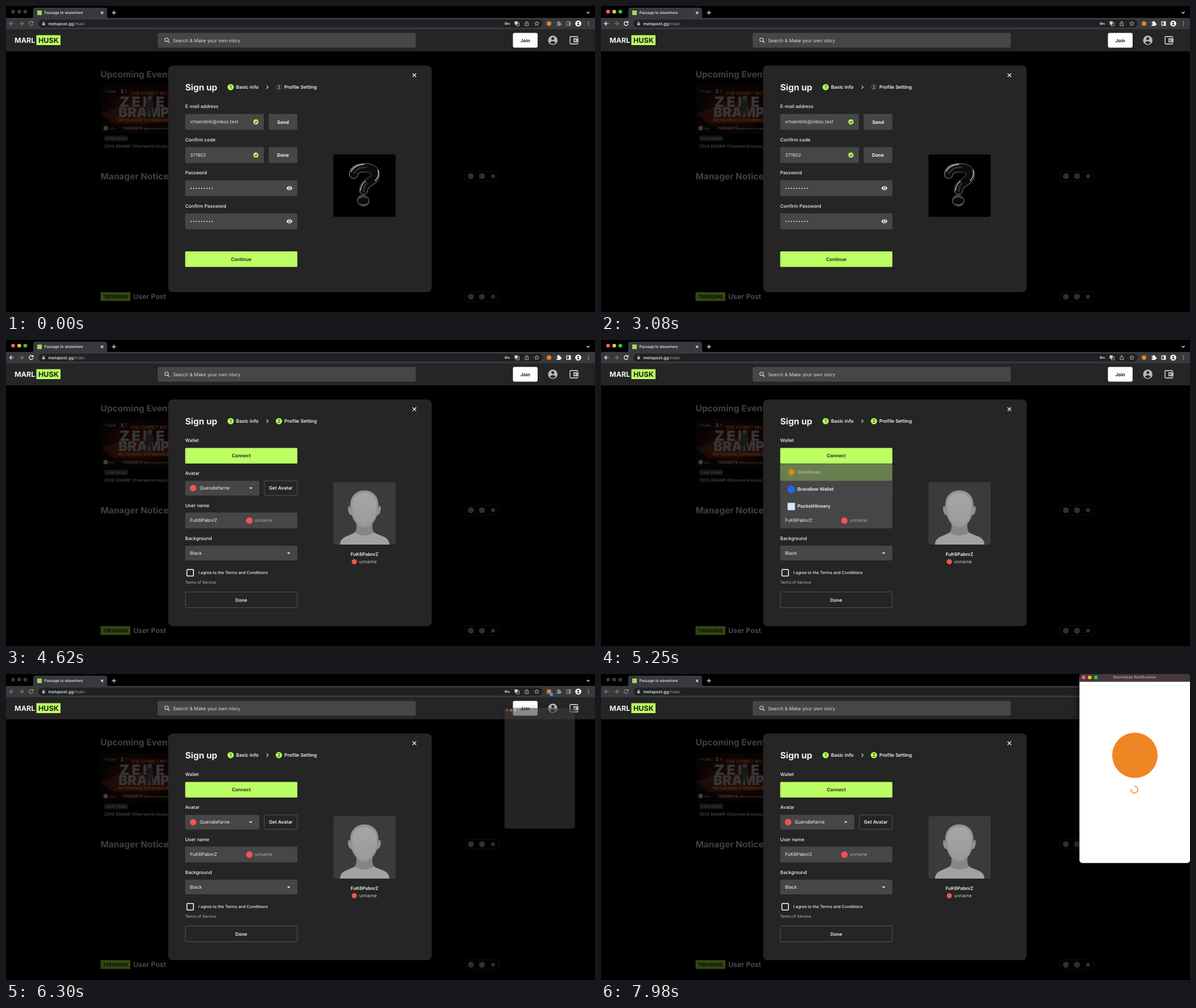
An HTML page for the animation above (8 s loop, 1037 by 540 pixels).

```html
<!DOCTYPE html>
<html lang="en">
<head>
<meta charset="utf-8">
<title>Sign up</title>
<style>
html, body { margin: 0; width: 100%; height: 100%; overflow: hidden; background: #000; }
svg { display: block; width: 100%; height: 100%; }
svg { font: 8.2px Inter, Roboto, sans-serif; fill: #f2f2f2; }
text { text-rendering: geometricPrecision; white-space: pre; }
.b { font-weight: 700; }
.sb { font-weight: 600; }
.m { font-weight: 500; }
.xb { font-weight: 800; }
.mid { text-anchor: middle; }
.ink { fill: #1c1c1c; }
.h { font-size: 15.4px; font-weight: 700; }
.dim { fill: #3f3f3f; }
.field { fill: #464646; }
.lime { fill: #bbff62; }
.edge { fill: none; stroke: #5c5c5c; stroke-width: .9; }
.line { fill: none; stroke: currentColor; stroke-width: 1.2; }

.live, .lights, .caret, .one, .two, .list, .badge, .popup, .page, .title { animation: 8s step-end infinite; }
.live { color: #8b8b8b; animation-name: wake; }
.lights { opacity: 0; animation-name: lights; }
.caret { opacity: 0; animation-name: caret; }
.one { animation-name: one; }
.two { opacity: 0; animation-name: two; }
.list { opacity: 0; animation-name: list; }
.row rect { animation: row 8s linear infinite; }
.row text { animation: rowtext 8s linear infinite; }
.badge { opacity: 0; animation-name: badge; }
.popup { opacity: 0; transform-origin: 939.5px 166px; animation-name: popup; filter: drop-shadow(0 5px 8px #0009); }
.page { opacity: 0; animation-name: page; }
.title { opacity: 0; animation-name: title; }
.spin { transform-origin: 939px 204px; animation: spin 8s linear infinite; }

@keyframes wake { 0%, 77.875%, 100% { color: #8b8b8b } 19.25% { color: #fff } }
@keyframes lights { 0%, 77.875%, 100% { opacity: 0 } 19.25% { opacity: 1 } }
@keyframes caret { 0%, 25.375%, 38.5%, 100% { opacity: 0 } 19.25%, 32.375% { opacity: 1 } }
@keyframes one { 0% { opacity: 1 } 42.875%, 100% { opacity: 0 } }
@keyframes two { 0% { opacity: 0 } 42.875%, 100% { opacity: 1 } }
@keyframes list { 0%, 76.125%, 100% { opacity: 0 } 60.375% { opacity: 1 } }
@keyframes row { 0%, 64.3% { fill: #464646; animation-timing-function: ease } 70.875%, 100% { fill: #bbff62 } }
@keyframes rowtext { 0%, 64.3% { fill: #f2f2f2; animation-timing-function: ease } 70.875%, 100% { fill: #1c1c1c } }
@keyframes badge { 0% { opacity: 0 } 76.125%, 100% { opacity: 1 } }
@keyframes popup {
  0% { opacity: 0; transform: scale(.4) }
  77.875% { opacity: .25; transform: scale(.42) }
  78.75% { opacity: .6; transform: scale(.638) }
  79.625% { opacity: .95; transform: scale(.92) }
  80.5%, 100% { opacity: 1; transform: none }
}
@keyframes page { 0% { opacity: 0 } 80.5%, 100% { opacity: 1 } }
@keyframes title { 0% { opacity: 0 } 82.25%, 100% { opacity: 1 } }
@keyframes spin {
  0%, 80.5% { transform: rotate(0deg); animation-timing-function: steps(22) }
  99.75%, 100% { transform: rotate(590deg) }
}
</style>
</head>
<body>
<svg viewBox="0 0 1037 540" preserveAspectRatio="none">
<defs>
  <radialGradient id="glow"><stop offset="0" stop-color="#260d06"/><stop offset=".6" stop-color="#140704"/><stop offset="1" stop-color="#060303"/></radialGradient>
  <linearGradient id="face" x2="0" y2="1"><stop offset="0" stop-color="#a6a6a6"/><stop offset="1" stop-color="#9a9a9a"/></linearGradient>
  <linearGradient id="glass" x2="1" y2="1"><stop offset="0" stop-color="#8c8c8c"/><stop offset=".5" stop-color="#3c3c3c"/><stop offset="1" stop-color="#7c7c7c"/></linearGradient>
  <filter id="soft"><feGaussianBlur stdDeviation=".6"/></filter>
  <path id="hook" d="M612 297C613 288 623 285.500 633 285.500C647 285.500 652 293 649.500 301C646 311 630 311 629.500 325"/>
  <g id="eye">
    <path fill="#fff" d="M-5.200 0C-3-4.700 3-4.700 5.200 0C3 4.700-3 4.700-5.200 0Z"/>
    <circle r="2.500" fill="#464646"/><circle r="1.400" fill="#fff"/>
  </g>
  <g id="tick">
    <circle r="4.600" class="lime"/><path d="M-2.200.1L-.6 1.700L2.300-1.500" fill="none" stroke="#333" stroke-width="1.200"/>
  </g>
  <path id="drop" d="M-2.800-1.300H2.800L0 1.600Z" fill="#fff"/>
  <path id="dots" d="M326 0H364" fill="none" stroke="#fff" stroke-width="1.900" stroke-linecap="round" stroke-dasharray="0 4.620"/>
  <g id="chips">
    <rect x="808.500" y="-8.500" width="59.500" height="17" rx="2" fill="none" stroke="#111"/>
    <g fill="#2e2e2e"><circle cx="818.500" r="5.300"/><circle cx="838" r="5.300"/><circle cx="857.500" r="3.600"/></g>
  </g>
</defs>

<rect width="1037" height="540" fill="#000"/>

<!-- browser -->
<path d="M45 22Q48 21 48 18V7Q48 3 52 3H174Q178 3 178 7V18Q178 21 181 22Z" fill="#38393c"/>
<rect y="21" width="1037" height="20" fill="#38393c"/>
<rect x="57" y="24" width="888" height="14" rx="7" fill="#202124"/>
<g fill="#3b3b3b"><circle cx="12.500" cy="10" r="3.300"/><circle cx="23.300" cy="10" r="3.300"/><circle cx="34" cy="10" r="3.300"/></g>
<g class="lights"><circle cx="12.500" cy="10" r="3.300" fill="#ff5f57"/><circle cx="23.300" cy="10" r="3.300" fill="#febc2e"/><circle cx="34" cy="10" r="3.300" fill="#28c840"/></g>
<rect x="55" y="8" width="8" height="8" class="lime" opacity=".8"/>
<text x="67.500" y="14.200" class="m" font-size="6.500">Passage to elsewhere</text>
<g color="#eee">
  <path class="line" d="M167.200 10L171.200 14M171.200 10L167.200 14M186.500 11.800H193.500M190 8.300V15.300"/>
  <path class="line" d="M1022.500 10.500L1025 13L1027.500 10.500"/>
</g>
<g class="live">
  <path class="line" d="M13.500 31H6.700M9.900 27.600L6.500 31L9.900 34.400"/>
  <path class="line" d="M47.200 29A3.500 3.500 0 1 0 47.600 32M47.800 26.800V29.700H44.900"/>
  <path fill="currentColor" d="M969.500 28.500H971.700A1.400 1.400 0 1 1 974.300 28.500H976.300V30.600A1.400 1.400 0 1 1 976.300 33.200V35H969.500V32.700A1.300 1.300 0 1 0 969.500 30.500Z"/>
  <rect class="line" x="987.200" y="27.800" width="6.600" height="6.400"/><path fill="currentColor" d="M990.800 27.500H994V34.500H990.800Z"/>
</g>
<path class="line" color="#858585" d="M23.500 31H30.300M27.100 27.600L30.500 31L27.100 34.400"/>
<rect x="64" y="30.200" width="4.400" height="3.800" fill="#bbb"/><path d="M65 30.500V29A1.200 1.200 0 0 1 67.400 29V30.500" fill="none" stroke="#bbb" stroke-width=".8"/>
<text x="74.500" y="33.600" class="m" font-size="7.400">metapost.gg<tspan fill="#a0a0a0" font-weight="400">/main</tspan></text>
<g color="#cfcfcf">
  <circle class="line" cx="880.300" cy="31" r="1.700"/><path class="line" d="M882.200 31H886.200V33M884.300 31V32.700"/>
  <rect x="895.500" y="27" width="5.300" height="5.800" fill="#cfcfcf"/><rect x="898.500" y="29.300" width="5" height="5.700" fill="none" stroke="#cfcfcf" stroke-width=".8"/>
  <path d="M915 29.800H914V34.700H919.600V29.800H918.600M916.800 32.300V27M915.200 28.500L916.800 26.900L918.400 28.500" fill="none" stroke="#cfcfcf" stroke-width=".9"/>
  <path d="M934.500 27L935.600 29.600L938.300 29.800L936.200 31.600L936.900 34.400L934.500 32.900L932.100 34.400L932.800 31.600L930.700 29.800L933.400 29.600Z" fill="none" stroke="#cfcfcf" stroke-width=".8"/>
</g>
<circle cx="956" cy="31" r="4" fill="#e8821e"/>
<g class="badge"><rect x="957" y="33" width="6.500" height="6" rx="1" fill="#2b7de9"/><text x="960.200" y="37.900" class="mid" font-size="5">1</text></g>
<circle cx="1007.500" cy="31" r="5.300" fill="#fff"/>
<g fill="#111"><circle cx="1007.500" cy="29.600" r="1.500"/><path d="M1004.600 33.800Q1007.500 29.700 1010.400 33.800Z"/></g>
<g fill="#ddd"><circle cx="1025.500" cy="28" r=".8"/><circle cx="1025.500" cy="31" r=".8"/><circle cx="1025.500" cy="34" r=".8"/></g>

<!-- site header -->
<rect y="41" width="1037" height="39" fill="#252525"/>
<text x="15" y="65.200" class="b" font-size="12.500">MARL</text>
<rect x="53.500" y="51.500" width="42.500" height="17.500" class="lime"/>
<text x="74.800" y="65.200" class="b ink mid" font-size="12.500">HUSK</text>
<rect x="267" y="47.500" width="454.500" height="26" rx="3" class="field"/>
<g color="#ddd"><circle class="line" cx="282.700" cy="59.600" r="3.100"/><path class="line" d="M285 62L288 65"/></g>
<text x="294" y="63.600" fill="#ddd">Search &amp; Make your own story</text>
<rect x="892.500" y="47.500" width="43.500" height="26" rx="3" fill="#fff"/>
<text x="914.200" y="63.600" class="b ink mid">Join</text>
<circle cx="962.700" cy="60.500" r="8.300" fill="#b9b9b9"/><circle cx="962.700" cy="57.500" r="2.500" fill="#252525"/><path d="M957.500 64.500Q962.700 59.500 967.900 64.500Q962.700 70 957.500 64.500Z" fill="#252525"/>
<rect x="993" y="54" width="13.500" height="13" rx="1.500" fill="none" stroke="#b9b9b9" stroke-width="1.800"/><rect x="998.500" y="56.500" width="9.800" height="8" rx="1" fill="#b9b9b9" stroke="#252525" stroke-width=".8"/><circle cx="1002" cy="60.500" r="1.300" fill="#252525"/>

<!-- dimmed page -->
<text x="166.500" y="125.500" class="h dim">Upcoming Events</text>
<rect x="167" y="139" width="130" height="87" fill="url(#glow)"/>
<path d="M167 190L200 178L297 182V205L190 208Z" fill="#30120a" opacity=".5"/>
<text x="219" y="157" class="xb" fill="#40200f" font-size="8.300">THE COMET MC</text>
<g fill="#363636" font-weight="900">
  <text x="200" y="178" font-size="25" letter-spacing="4">ZEKE</text>
  <text x="198" y="196" font-size="24">BRAMP</text>
</g>
<text x="197" y="204" class="xb" fill="#4a2816" font-size="7.100">METAVERSE EXPERIENCE</text>
<text x="205" y="218.200" class="xb" fill="#41352e" font-size="6.600">TUESDAYS <tspan font-size="4">8PM ET AUG 1ST &amp; 8TH</tspan></text>
<path d="M249 163A4 4 0 0 1 257 163L260 176L257 179L259 196H254L252.500 184L249 196H245L248 178L245 175Z" fill="#17191a"/>
<circle cx="253" cy="162" r="4" fill="#2a2d2f"/>
<circle cx="175.500" cy="215.500" r="4" class="dim"/><text x="181" y="217.500" class="dim" font-size="4.800">GHQ</text>
<circle cx="175.800" cy="150" r="1.400" fill="#5a1717"/><text x="179" y="152.600" class="m dim" font-size="7.200">Live</text>
<circle cx="204.500" cy="148.500" r="1.700" class="dim"/><path d="M201.500 153.200Q204.500 148.500 207.500 153.200Z" class="dim"/><text x="209.300" y="152.600" class="m dim" font-size="7.200">1</text>
<rect x="173" y="228.500" width="42" height="10" rx="2" fill="#151515"/>
<text x="194" y="236.100" class="m dim mid" font-size="7.200">Live-show</text>
<text x="173" y="249.900" class="sb dim" font-size="7.300">ZEKE BRAMP Otherworld music</text>
<text x="166.500" y="306.300" class="h dim">Manager Notice</text>
<use href="#chips" y="300.300"/>
<rect x="166.500" y="505" width="52.500" height="15.500" fill="#314713"/>
<text x="192.700" y="516" class="b mid" font-size="8.500" fill="#0a0d05">TRENDING</text>
<text x="224" y="517.300" class="sb" font-size="12.400" fill="#505050">User Post</text>
<use href="#chips" y="513"/>

<!-- dialog -->
<rect x="285.500" y="105" width="464" height="400" rx="8" fill="#252525"/>
<path class="line" color="#fff" d="M715.800 119L722.200 125.400M722.200 119L715.800 125.400"/>
<text x="315.500" y="149.300" class="h">Sign up</text>
<circle cx="395.500" cy="143.200" r="5.500" class="lime"/><text x="395.500" y="146.200" class="m ink mid">1</text>
<path class="line" color="#ddd" d="M458.700 140.300L461.600 143.200L458.700 146.100"/>
<g class="sb" font-size="8.400"><text x="405" y="146.200">Basic info</text><text x="490" y="146.200">Profile Setting</text></g>

<g class="one">
  <circle cx="480.500" cy="143.200" r="5.200" class="edge"/><text x="480.500" y="146.200" class="mid">2</text>
  <g class="m">
    <text x="315.500" y="180.200">E-mail address</text><text x="315.500" y="238.700">Confirm code</text>
    <text x="315.500" y="297.200">Password</text><text x="315.500" y="355.500">Confirm Password</text>
  </g>
  <g class="field">
    <rect x="315.500" y="190.500" width="138.500" height="28" rx="2"/><rect x="462.500" y="190.500" width="50.500" height="28" rx="2"/>
    <rect x="315.500" y="249" width="138.500" height="28" rx="2"/><rect x="462.500" y="249" width="50.500" height="28" rx="2"/>
    <rect x="315.500" y="307.500" width="197.500" height="28" rx="2"/><rect x="315.500" y="366" width="197.500" height="28" rx="2"/>
  </g>
  <g fill="#e4e4e4"><text x="324" y="207.300">vrtoenbhk@inbox.test</text><text x="324" y="265.700">371902</text></g>
  <use href="#tick" x="440" y="204.500"/><use href="#tick" x="440" y="263"/>
  <text x="487.800" y="207.500" class="b mid">Send</text><text x="487.800" y="266" class="b mid">Done</text>
  <use href="#dots" y="321.700"/><use href="#dots" y="380.200"/>
  <use href="#eye" x="499" y="321.500"/><use href="#eye" x="499" y="380"/>
  <rect class="caret" x="363.300" y="374" width=".8" height="11" fill="#fff"/>
  <rect x="315.500" y="433" width="197.500" height="27.500" rx="1.500" class="lime"/>
  <text x="414.200" y="449.700" class="sb ink mid">Continue</text>
  <rect x="576.500" y="262" width="109.500" height="110" rx="3" fill="#000"/>
  <g fill="none" stroke-linecap="round" filter="url(#soft)">
    <use href="#hook" stroke="url(#glass)" stroke-width="16"/><use href="#hook" stroke="#0b0b0b" stroke-width="13.500"/>
    <path d="M613 295Q619 284 634 284.500M635 313Q630 318 630 327" stroke="#2c2c2c" stroke-width="3.500"/>
    <path d="M608 292Q613 281 630 279.500M655 290Q658 300 650 308M624 326Q625 315 633 309" stroke="#c4c4c4" stroke-width="1.500"/>
    <ellipse cx="629" cy="343.500" rx="10" ry="9.500" fill="#0b0b0b" stroke="url(#glass)" stroke-width="1.400"/>
    <path d="M622.500 339Q629 334 635.500 339M623 349Q629 353 635 349" stroke="#999"/>
  </g>
</g>

<g class="two">
  <circle cx="480.500" cy="143.200" r="5.500" class="lime"/><text x="480.500" y="146.200" class="m ink mid">2</text>
  <g class="m">
    <text x="315.500" y="180.200">Wallet</text><text x="315.500" y="238.200">Avatar</text>
    <text x="315.500" y="294.500">User name</text><text x="315.500" y="352.800">Background</text>
  </g>
  <rect x="315.500" y="190.500" width="197.500" height="27.500" rx="1.500" class="lime"/>
  <text x="414.200" y="207.300" class="sb ink mid">Connect</text>
  <g class="field">
    <rect x="315.500" y="248.500" width="130.500" height="26" rx="2"/><rect x="315.500" y="304.500" width="197.500" height="28" rx="2"/><rect x="315.500" y="363" width="197.500" height="26" rx="2"/>
  </g>
  <g fill="#f0554d"><circle cx="329.500" cy="261.500" r="5.700"/><circle cx="428.500" cy="318.700" r="5.700"/><circle cx="613.200" cy="391.300" r="4.600"/></g>
  <text x="341" y="264.300">Quendlefarne</text>
  <use href="#drop" x="431" y="261.500"/><use href="#drop" x="497.700" y="376.200"/>
  <rect x="454.800" y="248.700" width="58" height="25.500" rx="2" class="edge"/>
  <text x="483.800" y="264.300" class="sb mid">Get Avatar</text>
  <text x="324" y="321.400">FuK6PabnrZ</text><text x="437.800" y="321.400" fill="#a9a9a9">unname</text>
  <text x="324" y="379">Black</text>
  <rect x="318.500" y="405" width="11.500" height="11.500" rx="1" fill="none" stroke="#fff" stroke-width="1.500"/>
  <text x="338.700" y="413.400" class="m" font-size="7.200">I agree to the Terms and Conditions</text>
  <text x="315.500" y="430.300" font-size="6.700" fill="#c4c4c4">Terms of Service</text>
  <rect x="315.800" y="444.700" width="197" height="27.800" rx="2" class="edge"/>
  <text x="414.200" y="461.500" class="sb mid">Done</text>

  <rect x="576.500" y="251" width="109.500" height="110" rx="3" fill="#3b3b3b"/>
  <path d="M588 361Q588 352 597 347.500L612 341Q617 338 617 332V312H645V332Q645 338 650 341L666 347.500Q675 352 675 361Z" fill="#a2a2a2"/>
  <path d="M617 314H645V332Q645 337 648 340Q631 350 614 340Q617 337 617 332Z" fill="#868686"/>
  <path d="M605.500 293Q601 292 602.500 301Q604.500 310 609 309ZM656.500 293Q661 292 659.500 301Q657.500 310 653 309Z" fill="#929292"/>
  <path d="M606.500 296C604.500 276 616 265.500 631 265.500C646 265.500 657.500 276 655.500 296C654.500 316 643 331 631 331C619 331 607.500 316 606.500 296Z" fill="#949494"/>
  <path d="M610 296C608 279 618 270 631 270C644 270 654 279 652 296C651 314 641 328 631 328C621 328 611 314 610 296Z" fill="url(#face)"/>
  <text x="631.200" y="380.900" class="sb mid">FuK6PabnrZ</text><text x="621.800" y="394" fill="#c4c4c4">unname</text>
</g>

<g class="list">
  <rect x="315.500" y="218.500" width="197.500" height="90" rx="2" class="field"/>
  <g class="row">
    <rect x="315.500" y="218.500" width="197.500" height="30" rx="2"/>
    <circle cx="335" cy="233.200" r="5.500" fill="#e8821e"/><text x="345.700" y="236.200" class="sb">GlomHaze</text>
  </g>
  <circle cx="335" cy="263.500" r="6.800" fill="#2a63e8"/><text x="345.700" y="266.300" class="sb">Brandlow Wallet</text>
  <rect x="328.500" y="287.300" width="13" height="13" fill="#d3e6fa"/><text x="345.700" y="296.400" class="sb">PocketHinnery</text>
</g>

<!-- wallet window -->
<g class="popup">
  <rect x="842.400" width="194.600" height="333.500" rx="5" fill="#3b3b3b"/>
  <rect class="page" x="842.400" y="4" width="194.600" height="329.500" rx="5" fill="#fff"/>
  <path d="M842.400 13.700V4Q842.400 0 846 0H1033Q1037 0 1037 4V13.700Z" fill="#45383b"/>
  <circle cx="849.800" cy="6" r="3.300" fill="#ff5f57"/><circle cx="860.500" cy="6" r="3.300" fill="#febc2e"/><circle cx="871.300" cy="6" r="3.300" fill="#28c840"/>
  <text x="939.500" y="8.300" class="title mid m" font-size="7.100" fill="#b9b0b2">GlomHaze Notification</text>
  <g class="page">
    <circle cx="940" cy="143.500" r="40" fill="#f08523"/>
    <circle class="spin" cx="939" cy="204" r="6" fill="none" stroke="#f08523" stroke-width="1.700" pathLength="360" stroke-dasharray="276 84" stroke-dashoffset="-42"/>
  </g>
</g>
</svg>
</body>
</html>
```
